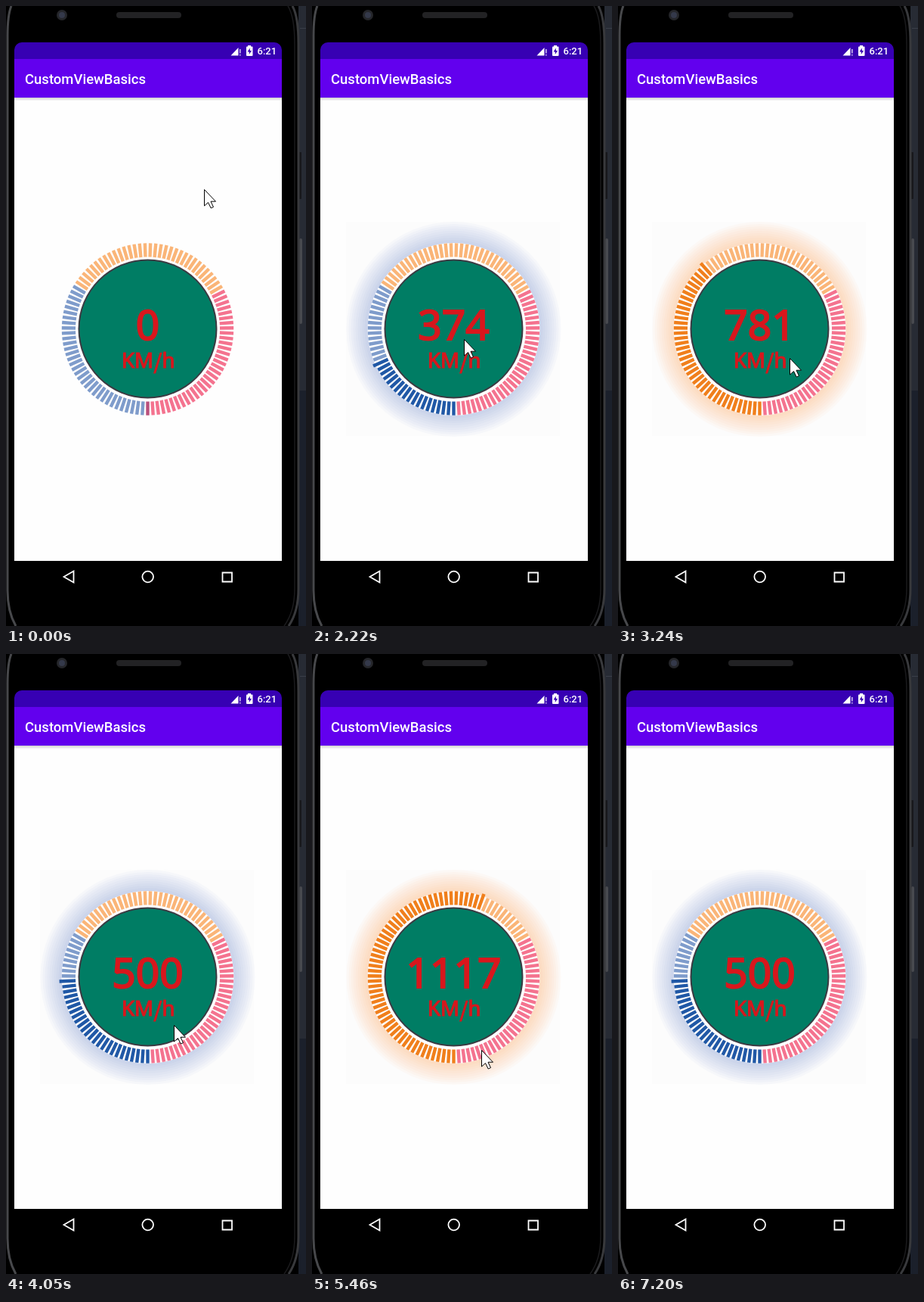
Animation, 397 px wide and 819 px high, one loop 9440 ms. Source, as an HTML page with a canvas:

```html
<!DOCTYPE html>
<html lang="en">
<head>
<meta charset="utf-8">
<title>Speed gauge</title>
<style>
  html, body { margin: 0; width: 100%; height: 100%; overflow: hidden; background: #000; }
  canvas { display: block; }
</style>
</head>
<body>
<canvas id="stage" width="397" height="819"></canvas>
<script>
const g = document.getElementById('stage').getContext('2d');
const LOOP = 9440, CX = 187.5, CY = 427, TICKS = 99, MAX = 2000;
const ZONES = [
  { on: '#2058a6', off: '#7f9ccb' },
  { on: '#f07f1c', off: '#fab578' },
  { on: '#e00f3c', off: '#f4738f' }
];
// Runs of screen updates: [first time, count], 120 ms apart
const RUNS = [[650, 4], [1160, 4], [1950, 2], [2220, 1], [2370, 3], [2760, 6], [3510, 3],
  [4050, 5], [4680, 1], [4830, 3], [5220, 3], [5610, 1], [5760, 1], [5910, 1],
  [6060, 5], [6690, 1], [6840, 4]];
// Pointer path: [time, x, y]
const PATH = [[530, 262, 242], [1010, 249, 364], [1520, 201, 440], [2220, 201, 440],
  [2760, 228, 478], [3000, 228, 478], [3360, 227, 459], [3750, 227, 459], [4050, 222, 490],
  [4290, 188, 517], [4530, 215, 503], [5070, 215, 503], [5460, 224, 523], [5910, 224, 523],
  [6540, 228, 535], [6690, 233, 547], [6840, 248, 590], [7080, 313, 787]];
const CLICKS = [1774, 4649], SWEEP = 1941, POINTER_END = 7200;

function screenTime(t) {
  let s = 0;
  for (const [start, n] of RUNS)
    if (t >= start) s = start + 120 * Math.min(n - 1, Math.floor((t - start) / 120));
  return s;
}

// Each click sweeps 0 -> 1500 -> 500 with a cosine ease
function speed(t) {
  const start = CLICKS.filter(c => c <= t).pop();
  if (start === undefined) return null;
  const p = Math.min(1, (t - start) / SWEEP);
  const e = (1 - Math.cos(Math.PI * p)) / 2;
  return Math.round(e < 0.5 ? 3000 * e : 2500 - 2000 * e);
}

function rect(x, y, w, h, color, r = 0) {
  g.fillStyle = color;
  g.beginPath();
  g.roundRect(x, y, w, h, r);
  g.fill();
}

function disc(x, y, r, color) {
  g.fillStyle = color;
  g.beginPath();
  g.arc(x, y, r, 0, 7);
  g.fill();
}

function line(path, color, width) {
  g.strokeStyle = color;
  g.lineWidth = width;
  g.stroke(new Path2D(path));
}

function text(s, x, y, font, color, align = 'left', outline = 0) {
  g.font = font;
  g.textAlign = align;
  g.fillStyle = g.strokeStyle = color;
  g.fillText(s, x, y);
  if (outline) {
    g.lineWidth = outline;
    g.strokeText(s, x, y);
  }
}

function phone() {
  rect(0, 0, 397, 819, '#000');
  rect(387, 0, 10, 508, '#272b34');
  rect(387, 508, 10, 311, '#1b202b');
  rect(389, 29, 8, 1, '#3a3f49');
  rect(387, 193, 4, 62, '#17181b', 1);
  rect(388, 307, 4, 113, '#484a4f', 2);
  line('M7 0Q2 12 2 40V772Q2 800 13 819', '#47484b', 3);
  line('M379 0Q387 14 387 50V770Q387 800 374 819', '#38393c', 3);
  line('M373 0Q382 14 382 50V770Q382 800 368 819', '#1b1b1d', 1.5);
  disc(74, 12, 7, '#25262a');
  disc(74, 12, 4, '#34394a');
  rect(146, 8, 86, 8, '#222224', 4);

  rect(11, 48, 354, 40, '#3700b3', [10, 10, 0, 0]);
  rect(11, 121, 354, 612, '#fefefe');
  rect(11, 70, 354, 51, '#6200ee');
  for (let i = 0; i < 4; i++) rect(11, 121 + i, 354, 1, `rgba(0,0,0,${0.16 - i * 0.04})`);
  text('CustomViewBasics', 25, 103, '500 18.5px Roboto, sans-serif', '#fff');
  text('6:21', 332.5, 64, '500 13px Roboto, sans-serif', '#fff');

  g.fillStyle = '#fff';
  g.fill(new Path2D('M297.5 65.5L307.5 55V65.5Z'));
  rect(309, 57, 1.6, 5.5, '#cbbcec');
  rect(309, 64, 1.6, 1.6, '#cbbcec');
  rect(320, 52, 4, 3, '#fff');
  rect(318, 53.5, 8.5, 12.5, '#fff', 1);
  g.fillStyle = '#3700b3';
  g.fill(new Path2D('M322.8 55.5L319.6 60.6H321.8V64L325 58.9H322.8Z'));

  line('M89.5 746.5V761.5L76.5 754Z', '#fff', 1.8);
  line('M286.5 748.5H299V760.5H286.5Z', '#fff', 1.8);
  line('M195 754A7.3 7.3 0 1 1 180.4 754A7.3 7.3 0 1 1 195 754Z', '#fff', 1.8);
}

function tick(i, color, outer = 113.7) {
  g.save();
  g.translate(CX, CY);
  g.rotate(i / TICKS * 2 * Math.PI);
  rect(-2.2, 95.5, 4.4, outer - 95.5, color);
  g.restore();
}

function gauge(v) {
  const active = v !== null;
  const zone = ZONES[Math.min(2, Math.floor((v || 0) * 3 / MAX))];
  const last = active ? Math.floor(v / MAX * TICKS) : -1;
  if (active) {
    rect(45, 285, 283, 283, '#fcfcfc');
    g.globalAlpha = 0.028;
    for (let r = 142; r > 113; r -= 3) disc(CX, CY, r, zone.on);
    g.globalAlpha = 1;
    disc(CX, CY, 114, '#fefefe');
  }
  for (let i = 0; i < TICKS; i++) {
    if (i <= last) tick(i, zone.on, i === last ? 117 : undefined);
    else tick(i, i ? ZONES[Math.floor((i - 1) / 33)].off : '#b9507c');
  }
  disc(CX, CY - 0.5, 92, '#3b3a42');
  disc(CX, CY - 0.5, 90, '#007d64');

  const red = '#d8171d', unit = '27.5px "Noto Sans", sans-serif';
  text(v || 0, CX, 440.5, '55px "Noto Sans", sans-serif', red, 'center', 2);
  text('KM', 153, 478, unit, red, 'left', 1.2);
  text('/', 201, 479.5, '27.5px "Noto Sans CJK JP", "Noto Sans CJK", sans-serif', red, 'center', 1.2);
  text('h', 206.5, 478, unit, red, 'left', 1.2);
}

function pointer(t) {
  if (t >= POINTER_END) return;
  let k = PATH.findIndex(p => p[0] > t);
  if (k < 0) k = PATH.length - 1;
  const b = PATH[k], a = PATH[Math.max(0, k - 1)];
  const f = b === a ? 0 : Math.min(1, (t - a[0]) / (b[0] - a[0]));
  g.save();
  g.translate(Math.round(a[1] + (b[1] - a[1]) * f) + 0.5, Math.round(a[2] + (b[2] - a[2]) * f) + 0.5);
  const arrow = 'M0 0V21.5L5 17L8.7 24.5L12 23L8.5 15.7H15Z';
  g.fillStyle = '#fff';
  g.fill(new Path2D(arrow));
  line(arrow, '#000', 1);
  g.restore();
}

const begin = performance.now();
function draw() {
  const t = screenTime((performance.now() - begin) % LOOP);
  phone();
  gauge(speed(t));
  pointer(t);
  requestAnimationFrame(draw);
}
draw();
</script>
</body>
</html>
```
